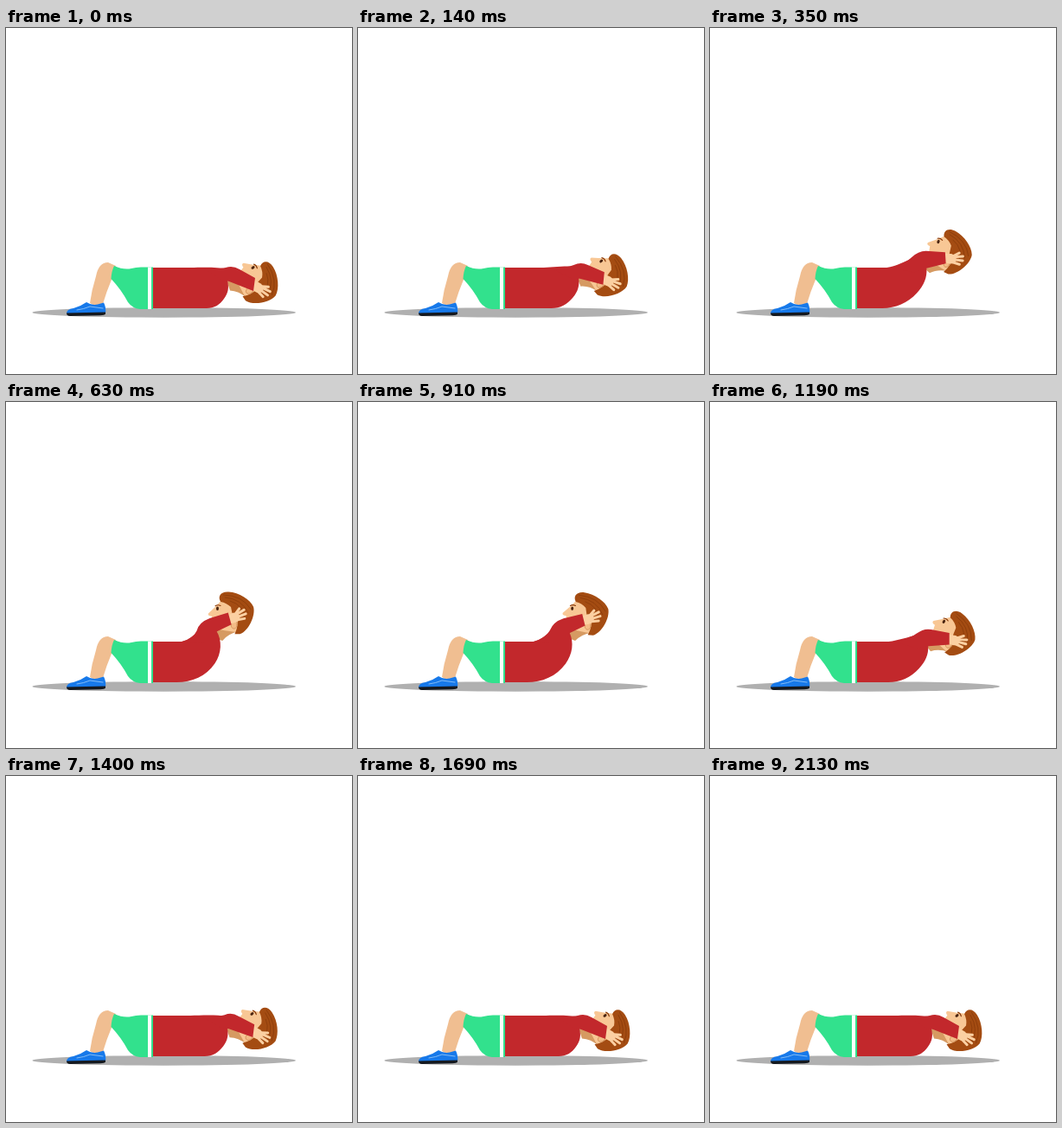
An HTML page for the animation above (2350 ms loop, 400 by 400 pixels).

```html
<!DOCTYPE html>
<html lang="en">
<head>
<meta charset="utf-8">
<title>Sit-up</title>
<style>
  html, body { margin: 0; width: 100%; height: 100%; overflow: hidden; background: #fff; }
  svg { display: block; width: 100vw; height: 100vh; }
</style>
</head>
<body>
<svg viewBox="0 0 400 400" fill="none" stroke-linecap="round" stroke-linejoin="round">
  <ellipse cx="182.700" cy="328.900" rx="152.300" ry="5.800" fill="#b0b0b0"/>

  <!-- leg -->
  <path d="M97 318Q99 303 104 287Q107 271 118 271L127 275L122 291Q116 305 112 319Q104 323 97 318Z" fill="#f0be91"/>
  <path d="M70 330Q70 325 78 324Q86 322 93 317Q99 321 106 319.500L113 317.500Q116 323 115 330Z" fill="#1779ea"/>
  <path d="M82 326Q90 325 97 322L112 324" stroke="#8fc3f6" stroke-width=".9"/>
  <path d="M70 329.600L115 328.400V330.500Q114 332 109 332.200L74 333Q70 333 70 329.600Z" fill="#15191f"/>

  <!-- head -->
  <g id="head">
    <path d="M-22 12L-24 30L-14 33Q-8 25 4 22L4 6Z" fill="#d69a62"/>
    <path d="M-16 -14L-22 -7L-31 2Q-32 5 -27 5L-25 12Q-23 20 -13 21L3 23L10 0L0 -14Z" fill="#f8c795"/>
    <path d="M-17 -12C-21 -18 -17 -24 -8 -23.500C4 -23 17 -15 21 -7C24 3 16 21 6 25L0 25Q5 14 2 5L-3 3L-5 -6Q-10 -11 -17 -12Z" fill="#a44c12"/>
    <path d="M-12 -17Q7 -16 15 0M-6 -13Q10 -9 11 8M-14 -20Q8 -20 18 -4" stroke="#8b3c0b" stroke-width=".8"/>
    <ellipse cx="-1" cy="14" rx="3.500" ry="5" fill="#f3bb86" stroke="#d08f57" stroke-width=".8"/>
    <ellipse cx="-20.500" cy="-4" rx="1.500" ry="2.200" fill="#4a2410"/>
    <path d="M-23 -7Q-20.500 -9 -17 -7.500" stroke="#8b3c0b" stroke-width="1.100"/>
  </g>

  <!-- trunk and shorts -->
  <path id="trunk" fill="#c2282c"/>
  <path d="M125 275Q136 280 145 278Q150 276.500 156 276.500H170V325H155Q146 324 141 317Q133 302 121.500 290Q122 281 125 275Z" fill="#32e18d"/>
  <path d="M166 276.500V325" stroke="#fff" stroke-width="4" stroke-linecap="butt"/>

  <!-- arm -->
  <g id="hand">
    <path d="M-3 -5L6 -5.500Q12 -4 12 1Q11 6 5 6L-3 5Z" fill="#fbd0a2"/>
    <path d="M8 -3L15 -7M9 -2L19.500 -3.500M9 1L19.500 1.500M8 4L16 6" stroke="#fbd0a2" stroke-width="3"/>
  </g>
  <path id="arm" fill="#c2282c"/>
</svg>
<script>
const STEP = 70, LOOP = 2350, REPS = 21;
const $ = id => document.getElementById(id);

// Each part has three poses: raised, halfway, lying.
const trunk = [
  "M170 277L204 277C213 275 218 268 223 265L243 264C250 275 250 290 242 302C232 317 216 324 198 324L170 324Z",
  "M170 277L204 277C215 275 224 270 232 266L250 277C251 288 247 297 239 306C228 318 214 324 198 324L170 324Z",
  "M170 277L214 277C225 277 245 276 256 279L256 292C258 300 257 306 252 313C247 320 241 324 232 324L170 324Z"
];
const arm = [
  "M203 277Q216 274 220 265Q222 255 235 250L256 243L260 257L243 265L230 278Z",
  "M208 277Q226 272 232 265Q240 257 249 257L271 258L272 271L250 277L235 282Z",
  "M228 278Q246 279 254 277Q262 274 270 279L288 289L286 304L258 293L250 292Z"
];
const head = ["264 243 0", "280 258 24", "294 296 55"];
const hand = ["258 251 -25", "272 265 2", "287 297 33"];

const nums = s => s.match(/-?\d+/g).map(Number);

// Quadratic blend through the three poses, u from 0 to 1
function blend(poses, u) {
  const [a, b, c] = poses.map(nums);
  const wa = (1 - u) * (1 - 2 * u), wb = 4 * u * (1 - u), wc = u * (2 * u - 1);
  let i = 0;
  return poses[0].replace(/-?\d+/g, () => {
    const v = wa * a[i] + wb * b[i] + wc * c[i];
    i++;
    return v.toFixed(2);
  });
}

function place(id, poses, u) {
  const [x, y, r] = blend(poses, u).split(" ");
  $(id).setAttribute("transform", `translate(${x} ${y}) rotate(${r})`);
}

function draw(now) {
  const k = Math.min(REPS, Math.floor((now % LOOP) / STEP));
  const u = (20.5 + 21.5 * Math.cos(2 * Math.PI * k / REPS)) / 42;
  $("trunk").setAttribute("d", blend(trunk, u));
  $("arm").setAttribute("d", blend(arm, u));
  place("head", head, u);
  place("hand", hand, u);
}

const start = performance.now();
function tick() {
  draw(performance.now() - start);
  requestAnimationFrame(tick);
}
tick();
</script>
</body>
</html>
```
